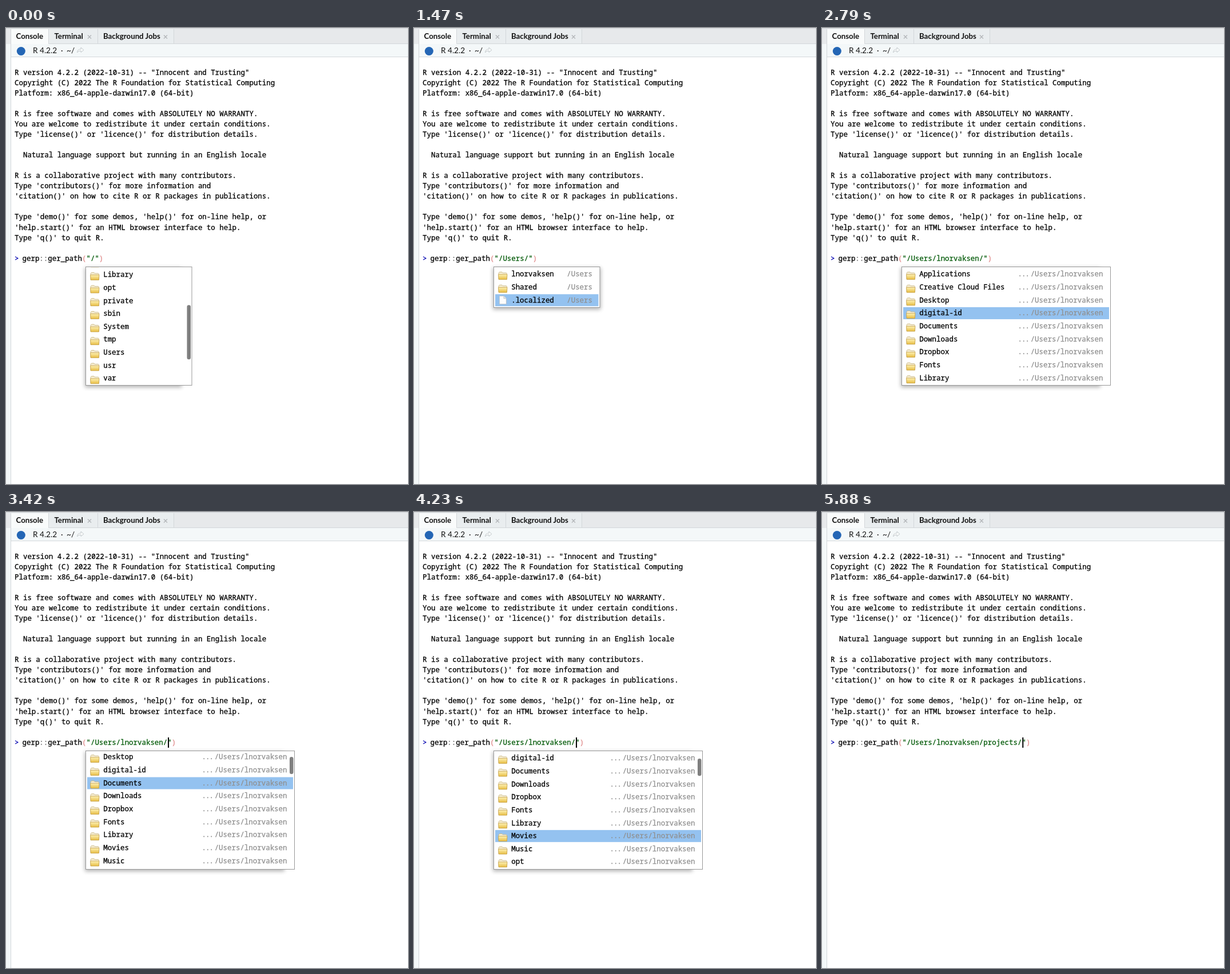
An HTML page that plays this animation: 703 px wide and 797 px high, repeating every 5.94 s.

```html
<!DOCTYPE html>
<html lang="en">
<head>
<meta charset="utf-8">
<title>Console path completion</title>
<style>
  html, body { margin: 0; width: 100%; height: 100%; overflow: hidden; background: #fff; }
  #stage { display: block; width: 703px; height: 797px; }
  text { white-space: pre; }
  .mono { font: 500 12.45px "Noto Sans Mono", "DejaVu Sans Mono", monospace; }
  .mono text, .mono tspan { fill: currentColor; stroke: currentColor; stroke-width: .3px; }
  .tab { font: bold 13.25px Lato, sans-serif; fill: #111; }
  .info { font: 13.6px Lato, sans-serif; fill: #111; }
  .frame { fill: #fff; stroke: #999; }
  .shadow { fill: #000; opacity: .3; filter: blur(3.5px); }
  .path { color: #909090; text-anchor: end; }
  .dots { letter-spacing: -1px; }
  .prompt { color: #0000b0; }
  .colons { color: #777; }
  .string { color: #035a08; }
  .paren { color: #e08c8c; }
  .edge { stroke: #d3d7da; fill: none; }
</style>
</head>
<body>
<svg id="stage" viewBox="0 0 703 797">
  <defs>
    <linearGradient id="gold" x2="0" y2="1">
      <stop offset="0" stop-color="#fdf1b4"/>
      <stop offset="1" stop-color="#e8bd42"/>
    </linearGradient>
    <g id="folder">
      <path d="M1 13.5V2.8L2.5 1H7L8.2 2.5H14.5L15.5 4V13.5Z" fill="#f5ecd0" stroke="#c5b17c" stroke-width=".8"/>
      <path d="M.6 5.2H16L15.4 14H1.2Z" fill="url(#gold)" stroke="#c6a048" stroke-width=".8"/>
    </g>
    <g id="file">
      <path d="M2.4 -2.5H10L14.4 2V11.8H2.4Z" fill="#fdfdfd" stroke="#b5bac0" stroke-width=".8"/>
      <path d="M10 -2.5V2H14.4" fill="#e6e9ec" stroke="#b5bac0" stroke-width=".8"/>
    </g>
  </defs>

  <rect width="703" height="797" fill="#fff"/>
  <rect width="8" height="797" fill="#f4f8f9"/>
  <rect width="703" height="28" fill="#e7e9eb"/>
  <rect x="75" y="2" width="218" height="25" fill="#e9edef"/>
  <rect x="8" y="27" width="695" height="24" fill="#f4f8f9"/>
  <rect x="8.5" y="2" width="66" height="26" fill="#f9fbfb"/>
  <path class="edge" d="M0 .5H703M8.5 2V797M74.5 2V27.5H703M160.5 2V27M293.5 2V27M8 50.5H703"/>
  <g class="tab">
    <text x="17.5" y="19.3">Console</text>
    <text x="84.5" y="19.3">Terminal</text>
    <text x="170" y="19.3">Background Jobs</text>
  </g>
  <path d="M143 12.5l6 6m0-6l-6 6M276 12.5l6 6m0-6l-6 6" stroke="#b4b8bb" stroke-width="1.5"/>
  <circle cx="26.3" cy="40.5" r="7.5" fill="#2466b5"/>
  <g class="info">
    <text x="47" y="44">R 4.2.2</text>
    <text x="96" y="44">·</text>
    <text x="106" y="44">~/</text>
  </g>
  <path d="M124.5 43C125 38.5 127 37 131 37V34L136 38.5L131 42.5V40C128 40 126 40.5 124.5 43Z" fill="#f8fafa" stroke="#c3c9cc"/>

  <g id="banner" class="mono"></g>
  <g class="mono">
    <text x="15" y="406.8" class="prompt">&gt;</text>
    <text x="28.5" y="406.8">gerp<tspan class="colons">::</tspan>ger_path<tspan class="paren">(</tspan><tspan id="typed" class="string"></tspan><tspan class="paren">)</tspan></text>
  </g>
  <rect id="caret" y="394" width="2" height="18"/>
  <g id="popups" class="mono"></g>
</svg>

<script>
const LOOP = 5940, ROW = 22.65, CHAR = 7.47, TOP = 418, MAX_ROWS = 9, TRACK = 202;
const USER = "lnorvaksen", HOME = `/Users/${USER}`;
const $ = id => document.getElementById(id);

function add(parent, tag, attrs = {}, content) {
  const el = document.createElementNS("http://www.w3.org/2000/svg", tag);
  for (const key in attrs) el.setAttribute(key, attrs[key]);
  if (content !== undefined) el.textContent = content;
  return parent.appendChild(el);
}

// Ease-out progress from 0 to 1 between two times
function glide(t, start, end) {
  const p = Math.min(1, Math.max(0, (t - start) / (end - start)));
  return 1 - (1 - p) ** 2;
}

`R version 4.2.2 (2022-10-31) -- "Innocent and Trusting"
Copyright (C) 2022 The R Foundation for Statistical Computing
Platform: x86_64-apple-darwin17.0 (64-bit)

R is free software and comes with ABSOLUTELY NO WARRANTY.
You are welcome to redistribute it under certain conditions.
Type 'license()' or 'licence()' for distribution details.

  Natural language support but running in an English locale

R is a collaborative project with many contributors.
Type 'contributors()' for more information and
'citation()' on how to cite R or R packages in publications.

Type 'demo()' for some demos, 'help()' for on-line help, or
'help.start()' for an HTML browser interface to help.
Type 'q()' to quit R.`.split("\n").forEach((line, i) =>
  add($("banner"), "text", { x: 15, y: 81.6 + i * 18.06 }, line));

// Each stage begins when its path is inserted; total is the row count behind the scrollbar
const stages = [
  {
    begin: -700, opens: 0, path: "/", width: 185.5, total: 19,
    names: "Applications,bin,cores,dev,etc,home,Library,opt,private,sbin,System,tmp,Users,usr,var,Volumes",
    hover: t => 4 + 8 * glide(t, 30, 390),
    scroll: () => 135,
    bar: t => 1 - glide(t, 210, 390)
  },
  {
    begin: 720, opens: 1020, path: "/Users/", label: "/Users", width: 185.5, total: 3,
    names: `${USER},Shared,.localized`,
    hover: t => 2 * glide(t, 1200, 1320) - 2 * glide(t, 1500, 1740),
    scroll: () => 0,
    bar: () => 0
  },
  {
    begin: 2200, opens: 2340, path: `${HOME}/`, label: HOME, dots: "...", width: 365, total: 60,
    names: "Applications,Creative Cloud Files,Desktop,digital-id,Documents,Downloads,Dropbox,Fonts,Library,Movies,Music,opt,Pictures,projects,Public,R",
    hover: t => 4 * glide(t, 2610, 3000) + 3 * glide(t, 3780, 3870)
      + 2 * glide(t, 4050, 4260) + 4 * glide(t, 4980, 5460),
    scroll: t => 68 * glide(t, 3180, 3720) + 44 * glide(t, 4410, 4800),
    bar: t => glide(t, 3180, 3240) - glide(t, 4980, 5250)
  },
  { begin: 5700, path: `${HOME}/projects/` }
];

function makePopup({ names, label = "", dots = "", width, total }) {
  const rows = names.split(",");
  const scrolls = rows.length > MAX_ROWS;
  const height = Math.round(Math.min(rows.length, MAX_ROWS) * ROW + 3);
  const group = add($("popups"), "g");
  add(group, "rect", { class: "shadow", x: 138, y: TOP + 1, width: width - (scrolls ? 16 : -3), height: height + 2 });
  add(group, "rect", { class: "frame", x: 139.5, y: TOP - .5, width, height });
  const view = add(group, "svg", { x: 140, y: TOP, width: width - 1, height: height - 1 });
  const list = add(view, "g");
  const mark = add(list, "rect", { x: 2, width: width - 5, height: 21, fill: "#94c2f0" });
  rows.forEach((name, i) => {
    const top = 2 + i * ROW, y = top + 14.3, right = width - 13.5;
    add(list, "use", { href: name.startsWith(".") ? "#file" : "#folder", x: 7, y: top + 5.5 });
    add(list, "text", { x: 30.2, y }, name);
    add(list, "text", { class: "path", x: right, y }, label);
    add(list, "text", { class: "path dots", x: right - label.length * CHAR - 2.5, y }, dots);
  });
  const bar = add(view, "rect", {
    x: width - 9, width: 6.5, rx: 3.25, fill: "#7f7f7f", height: TRACK ** 2 / (total * ROW)
  });
  return { group, list, mark, bar };
}

for (const stage of stages) if (stage.names) stage.popup = makePopup(stage);

function draw(t) {
  const current = stages.findLast(stage => stage.begin <= t);
  $("typed").textContent = `"${current.path}"`;
  $("caret").setAttribute("x", 148.6 + current.path.length * CHAR);
  $("caret").setAttribute("opacity", (t - current.begin) % 1000 < 500 ? 1 : 0);

  for (const stage of stages) {
    if (!stage.popup) continue;
    const { group, list, mark, bar } = stage.popup;
    const open = stage === current && t >= stage.opens;
    group.setAttribute("display", open ? "inline" : "none");
    if (!open) continue;
    const offset = stage.scroll(t);
    list.setAttribute("transform", `translate(0 ${-offset})`);
    mark.setAttribute("y", 2 + Math.round(stage.hover(t)) * ROW);
    bar.setAttribute("y", 3 + offset * TRACK / (stage.total * ROW));
    bar.setAttribute("opacity", stage.bar(t));
  }
}

function tick() {
  draw(performance.now() % LOOP);
  requestAnimationFrame(tick);
}
tick();
</script>
</body>
</html>
```
